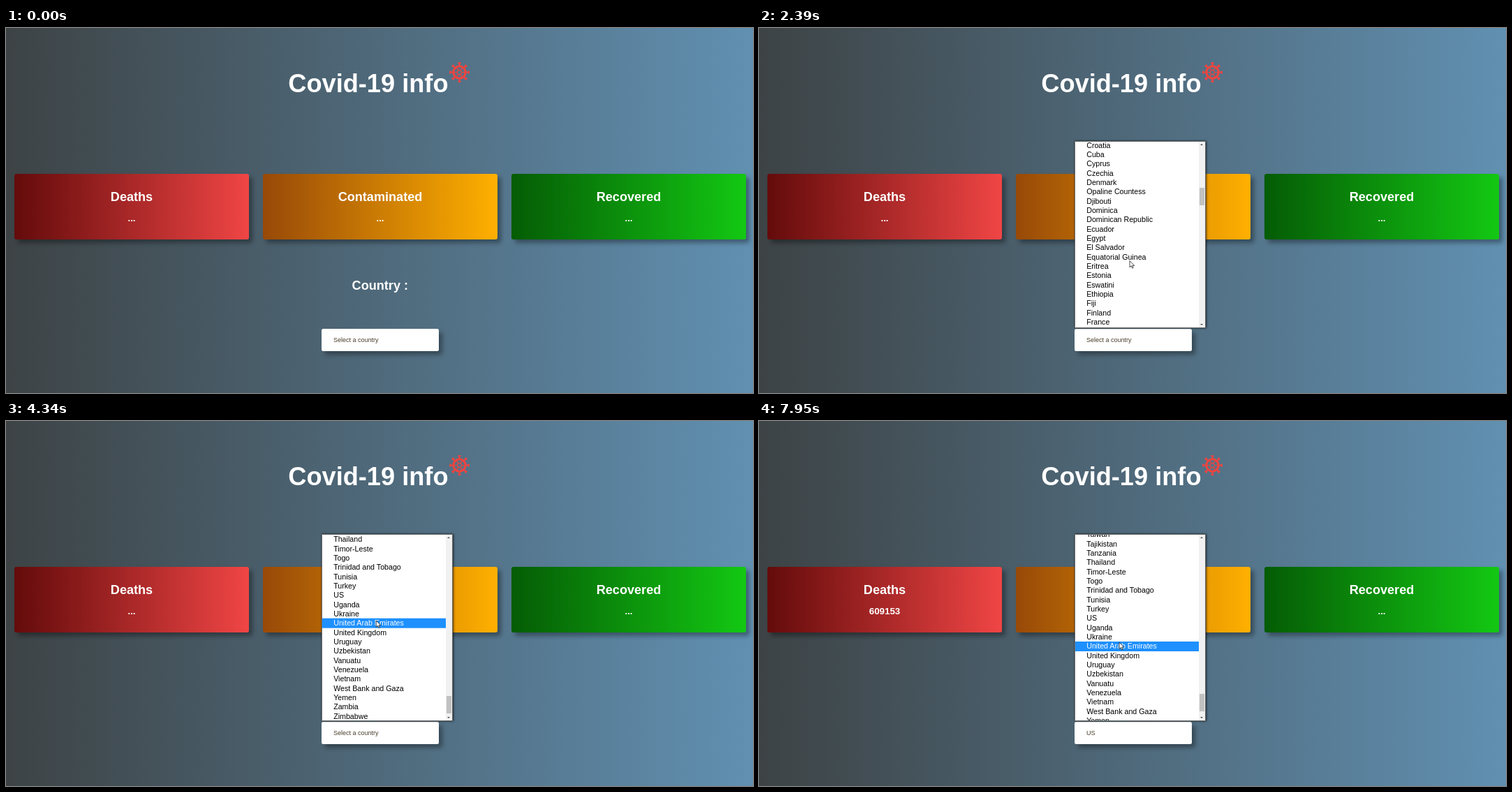
These frames come from a looping animation (1070 px wide and 523 px high, 8 s). An HTML page:

```html
<!DOCTYPE html>
<html lang="en">
<head>
<meta charset="utf-8">
<title>Covid-19 info</title>
<style>
html, body { margin: 0; width: 100%; height: 100%; overflow: hidden; }
body {
  position: relative;
  background: linear-gradient(90deg, #3d4345, #6190b1);
  font-family: "Liberation Sans", Arial, sans-serif;
  color: #fff;
}
div, svg { position: absolute; }
h1, h2, p { position: absolute; margin: 0; line-height: 0; white-space: nowrap; font-weight: bold; }
h1 { left: 404.3px; top: 79.5px; font-size: 36.2px; }
h2 { left: 0; right: 0; text-align: center; font-size: 18.1px; }
.card {
  top: 208.5px; width: 336px; height: 94.5px; border-radius: 3px;
  box-shadow: 5px 5px 6px rgba(0, 0, 0, .35);
}
.card h2 { top: 33.2px; }
.card p { left: 0; right: 0; top: 64px; text-align: center; font-size: 13.33px; }
#deaths { left: 12px; background: linear-gradient(90deg, #640b0b, #f04545); }
#cases { left: 368px; background: linear-gradient(90deg, #984908, #ffb000); }
#cured { left: 724px; background: linear-gradient(90deg, #055c05, #13c813); }
#country { top: 368.7px; left: .8px; right: -.8px; }
#select {
  left: 452px; top: 430.5px; width: 167.5px; height: 32px; border-radius: 2.5px;
  background: #fff; box-shadow: 5px 5px 6px rgba(0, 0, 0, .35);
}
#select p { left: 17px; top: 16.2px; font-size: 9px; font-weight: normal; color: #463c28; }
#popup {
  left: 452px; top: 162px; width: 187.5px; height: 268px;
  box-shadow: 1px 0 3px rgba(0, 0, 0, .65), 0 0 1px rgba(0, 0, 0, .6);
}
#sheet { inset: 0; box-sizing: border-box; border: 1px solid #707070; background: #fff; }
#view { left: 0; top: 0; width: 177px; height: 266px; overflow: hidden; }
#list { left: 0; top: 0; width: 177px; }
#list div {
  left: 0; width: 161px; height: 13.333px; padding-left: 16.2px;
  font-size: 10.667px; line-height: 13.333px; color: #000; white-space: nowrap;
}
#list .on { background: #1e90ff; color: #fff; }
#bar { right: 0; top: 0; width: 8.5px; height: 266px; background: #f1f1f1; }
#thumb { left: .5px; width: 7.5px; height: 25px; background: #c1c1c1; }
.tip { left: 2px; border: 2.3px solid transparent; }
.up { top: 1px; border-bottom-color: #505050; }
.down { bottom: 1px; border-top-color: #505050; }
#cursor { left: 0; top: 0; width: 1px; height: 1px; overflow: visible; }
#cursor path { fill: #fff; stroke: #181c20; stroke-width: .8; stroke-linejoin: round; }
</style>
</head>
<body>
<h1>Covid-19 info</h1>
<svg id="virus" style="left:634px;top:48px" width="31" height="31" viewBox="-15.5 -15.5 31 31"
  fill="none" stroke="#ee4540">
  <circle r="8.7" stroke-width="3"/>
</svg>

<div class="card" id="deaths"><h2>Deaths</h2><p></p></div>
<div class="card" id="cases"><h2>Contaminated</h2><p></p></div>
<div class="card" id="cured"><h2>Recovered</h2><p></p></div>

<h2 id="country"></h2>
<div id="select"><p></p></div>

<div id="popup">
  <div id="sheet">
    <div id="view"><div id="list"></div></div>
    <div id="bar"><div class="tip up"></div><div id="thumb"></div><div class="tip down"></div></div>
  </div>
</div>

<svg id="cursor">
  <path id="arrow" d="M0 0V9.4L2.2 7.4 3.7 10.7 5.2 10 3.7 6.9H6.7Z"/>
  <path id="hand" d="M-1 .8Q0 -1 1.1 .8V4.6L5 5.5Q6.8 6 6.4 8.6L5.3 12.2H.6L-2.9 7.8Q-3.4 6 -1 7Z"/>
</svg>

<script>
const LOOP = 8000, ROW = 40 / 3, TOP = 163;
const $ = q => document.querySelector(q);

const names = ("Select a country|Afghanistan|Albania|Algeria|Andorra|Angola|Antigua and Barbuda|Argentina|Armenia|" +
  "Australia|Austria|Azerbaijan|Bahamas|Bahrain|Bangladesh|Barbados|Belarus|Belgium|Belize|Benin|Bhutan|Bolivia|" +
  "Bosnia and Herzegovina|Botswana|Brazil|Brunei|Bulgaria|Burkina Faso|Burma|Burundi|Cabo Verde|Cambodia|Cameroon|" +
  "Canada|Central African Republic|Chad|Chile|China|Colombia|Comoros|Congo (Brazzaville)|Congo (Kinshasa)|Costa Rica|" +
  "Cote d'Ivoire|Croatia|Cuba|Cyprus|Czechia|Denmark|Opaline Countess|Djibouti|Dominica|Dominican Republic|Ecuador|" +
  "Egypt|El Salvador|Equatorial Guinea|Eritrea|Estonia|Eswatini|Ethiopia|Fiji|Finland|France|Gabon|Gambia|Georgia|" +
  "Germany|Ghana|Greece|Grenada|Guatemala|Guinea|Guinea-Bissau|Guyana|Haiti|Holy See|Honduras|Hungary|Iceland|India|" +
  "Indonesia|Iran|Iraq|Ireland|Israel|Italy|Jamaica|Japan|Jordan|Kazakhstan|Kenya|Kiribati|Korea, South|Kosovo|Kuwait|" +
  "Kyrgyzstan|Laos|Latvia|Lebanon|Lesotho|Liberia|Libya|Liechtenstein|Lithuania|Luxembourg|MS Tarvelund|Madagascar|" +
  "Malawi|Malaysia|Maldives|Mali|Malta|Marshall Islands|Mauritania|Mauritius|Mexico|Micronesia|Moldova|Monaco|Mongolia|" +
  "Montenegro|Morocco|Mozambique|Namibia|Nepal|Netherlands|New Zealand|Nicaragua|Niger|Nigeria|North Macedonia|Norway|" +
  "Oman|Pakistan|Panama|Papua New Guinea|Paraguay|Peru|Philippines|Poland|Portugal|Qatar|Romania|Russia|Rwanda|" +
  "Saint Kitts and Nevis|Saint Lucia|Saint Vincent and the Grenadines|Samoa|San Marino|Sao Tome and Principe|" +
  "Saudi Arabia|Senegal|Serbia|Seychelles|Sierra Leone|Singapore|Slovakia|Slovenia|Solomon Islands|Somalia|" +
  "South Africa|South Sudan|Spain|Sri Lanka|Sudan|Spring Orbathlon 2020|Suriname|Sweden|Switzerland|Syria|Taiwan*|" +
  "Tajikistan|Tanzania|Thailand|Timor-Leste|Togo|Trinidad and Tobago|Tunisia|Turkey|US|Uganda|Ukraine|" +
  "United Arab Emirates|United Kingdom|Uruguay|Uzbekistan|Vanuatu|Venezuela|Vietnam|West Bank and Gaza|Yemen|Zambia|" +
  "Zimbabwe").split("|");

const rows = names.map((name, i) => {
  const row = document.createElement("div");
  row.textContent = name;
  row.style.top = i * ROW + "px";
  $("#list").append(row);
  return row;
});

function stroke(d, width, angle) {
  const p = document.createElementNS("http://www.w3.org/2000/svg", "path");
  p.setAttribute("d", d);
  p.setAttribute("stroke-width", width);
  p.setAttribute("transform", `rotate(${angle})`);
  $("#virus").append(p);
}
for (let a = 0; a < 360; a += 45) stroke("M0 -9V-13.2M-2 -13.3H2", 2.2, a);
for (let a = 0; a < 360; a += 60) stroke("M-1.7 -3H1.7M1.7 -3L4.4 -7.2", 1.3, a);

// Tracks are lists of [time, value...]
const cursorTrack = [
  [350, 951, 495], [850, 600, 432], [1150, 546, 445], [1520, 546, 445], [1980, 531, 333.5],
  [2570, 531, 333.5], [3100, 534.5, 339], [4040, 534.5, 339], [4590, 527, 246], [4880, 527, 246],
  [4890, 523, 244], [5050, 523, 244], [5455, 513, 311], [5530, 513, 311], [5820, 528, 410],
  [6350, 538, 450.5], [6760, 538, 450.5], [6930, 538, 416.4], [7000, 538, 416.4], [7090, 539, 418],
  [7340, 539, 418], [7720, 516, 317.2]
];
const scrollTrack = [
  [2100, 0], [2390, 588], [2560, 588], [3220, 1922], [3330, 1922], [3370, 1933], [3410, 1933],
  [3590, 2333.3], [5100, 2333.3], [5100, 2187.8], [7680, 2187.8], [7950, 2300]
];
const hoverFade = [[5050, 1], [5220, .58], [5400, .58], [5460, .69], [5700, 1]];
const selectFade = [[5060, 1], [5250, 0], [5530, 0], [5800, 1]];
const oldFade = [[5250, 1], [5460, .28], [5560, 0]];
const casesFade = [[5080, 1], [5380, 0]];
const newFade = [[5640, 0], [6200, 1]];

const linear = u => u;
const smooth = u => u * u * (3 - 2 * u);

function at(track, t, ease = linear) {
  const i = track.findIndex(k => k[0] > t);
  if (i === 0) return track[0].slice(1);
  if (i < 0) return track[track.length - 1].slice(1);
  const a = track[i - 1], b = track[i];
  const u = ease((t - a[0]) / (b[0] - a[0]));
  return a.slice(1).map((v, j) => v + (b[j + 1] - v) * u);
}

const cursorAt = t => at(cursorTrack, t, smooth);
const scrollAt = t => at(scrollTrack, t)[0];
const between = (t, a, b) => t >= a && t < b;

// The highlight sticks to its row while the wheel turns
function hoverRow(t) {
  if (between(t, 2100, 3170)) t = 2099;
  else if (between(t, 3170, 3590)) t = 3180;
  const y = cursorAt(t)[1];
  if (y > 429) return t < 5000 ? 0 : names.indexOf("US");
  return Math.floor((y - TOP + scrollAt(t)) / ROW);
}

function setValue(id, text, opacity) {
  const p = $(id + " p");
  p.textContent = text;
  p.style.opacity = opacity;
}

let lit = -1;
function render(t) {
  const chosen = t >= 5050;
  const fresh = t >= 5600;
  const shown = newFade && at(newFade, t)[0];
  const gone = at(oldFade, t)[0];

  $("#country").textContent = chosen ? "Country : US" : "Country :";
  $("#select p").textContent = chosen ? "US" : names[0];
  $("#select").style.opacity = at(selectFade, t)[0];
  $("#cases").style.opacity = at(hoverFade, t)[0];
  setValue("#deaths", fresh ? "609153" : "...", fresh ? shown : gone);
  setValue("#cases", fresh ? "34132071" : "...", fresh ? shown : at(casesFade, t)[0]);
  setValue("#cured", "...", fresh ? shown : gone);

  const first = between(t, 1190, 5050);
  const start = first ? 1190 : 6630;
  const open = first || t >= 6630;
  const filled = first ? t >= 1520 : t >= 6820;
  $("#popup").style.visibility = open ? "visible" : "hidden";
  $("#popup").style.opacity = Math.min(1, Math.max(0, (t - start + 40) / 200));
  $("#sheet").style.display = filled ? "block" : "none";

  const s = scrollAt(t);
  $("#list").style.transform = `translateY(${-s}px)`;
  $("#thumb").style.top = 11 + s / (names.length * ROW) * 245 + "px";
  const row = hoverRow(t);
  if (row !== lit) {
    if (rows[lit]) rows[lit].className = "";
    if (rows[row]) rows[row].className = "on";
    lit = row;
  }

  const [x, y] = cursorAt(t);
  const onSelect = between(x, 452, 619.5) && between(y, 430.5, 462.5);
  $("#cursor").style.visibility = t < 350 ? "hidden" : "visible";
  $("#cursor").style.transform = `translate(${x}px, ${y}px)`;
  $("#arrow").style.display = onSelect ? "none" : "";
  $("#hand").style.display = onSelect ? "" : "none";
}

function tick() {
  render(performance.now() % LOOP);
  requestAnimationFrame(tick);
}
tick();
</script>
</body>
</html>
```
